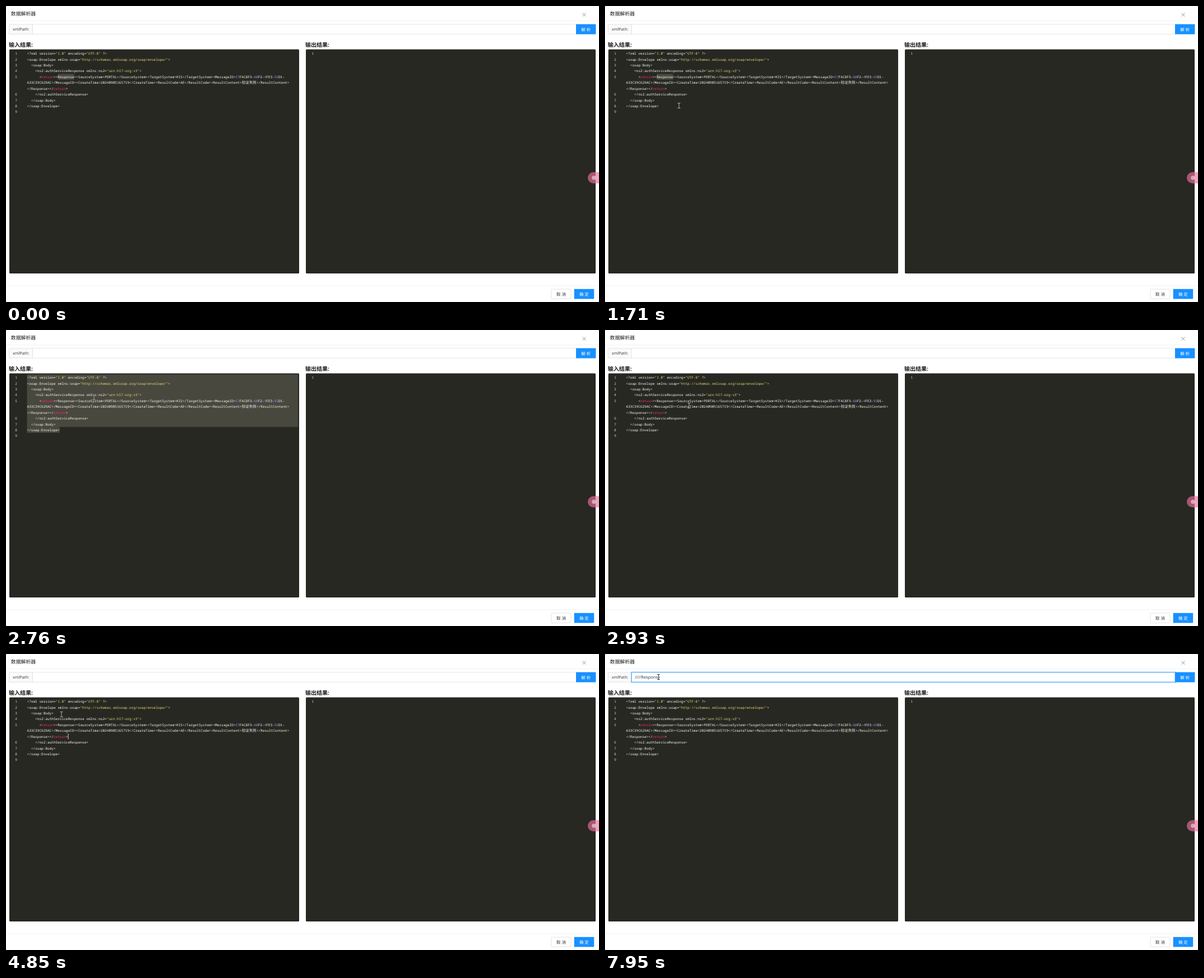
Write an HTML page that moves like this. It is 1058 px wide and 529 px high and loops after 8 s.

```html
<!DOCTYPE html>
<html lang="zh-CN">
<head>
<meta charset="utf-8">
<style>
html, body { margin: 0; width: 100%; height: 100%; overflow: hidden; background: #b5b5b5; }
svg { display: block; width: 1058px; height: 529px; }
text { font-family: "Open Sans", "Noto Sans CJK SC", "Noto Sans CJK", sans-serif; text-rendering: geometricPrecision; white-space: pre; }
.ui { font-size: 7.5px; fill: #333; }
.mid { text-anchor: middle; }
.title { font-size: 8.88px; font-weight: 500; fill: #1c1c1c; }
.head { font-size: 10px; font-weight: 700; fill: #1c1c1c; }
.code { font: 500 6.09px "Noto Sans Mono", "Noto Sans CJK SC", "Noto Sans CJK", monospace; fill: #f8f8f2; }
.num { fill: #d4d4ce; text-anchor: middle; }
.string { fill: #e6db74; }
.tag { fill: #f92672; }
.digit { fill: #ae81ff; }
.han { font-size: 6.65px; }
.editor { fill: #272822; }
.line { stroke: #ececec; stroke-width: .7; }
.box { fill: #fff; stroke: #d9d9d9; stroke-width: .7; }
.primary { fill: #1890ff; }
#ibeam { mix-blend-mode: difference; fill: none; stroke: #fff; stroke-width: .8; }
</style>
</head>
<body>
<svg viewBox="0 0 1058 529">
  <rect width="1058" height="529" rx="2" fill="#fff"/>
  <text class="title" x="8.8" y="16.8">数据解析器</text>
  <path d="M1028.6 12.6l6 6m0-6l-6 6" stroke="#777" stroke-width=".8"/>
  <path class="line" d="M0 26.7H1058M0 500H1058"/>

  <rect class="box" x="5.5" y="32.8" width="42" height="17.4" rx="1" style="fill:#fafafa"/>
  <text class="ui" x="12" y="44.4" style="font-size:7.2px">xmlPath:</text>
  <rect class="box" x="47.4" y="32.8" width="970" height="17.4"/>
  <rect id="glow" x="46.9" y="32.4" width="970.6" height="18.2" fill="none" stroke="#1890ff" stroke-opacity=".3" stroke-width="1.8"/>
  <rect id="hover" x="47.3" y="32.8" width="970" height="17.4" fill="none" stroke="#40a9ff" stroke-width=".9"/>
  <path class="primary" d="M1017 32.5h34.4q1 0 1 1v16q0 1-1 1H1017z"/>
  <text class="ui mid" x="1034.8" y="44.6" style="fill:#fff">解 析</text>
  <text class="ui" id="typed" x="53.3" y="44.4"></text>

  <text class="head" x="5" y="73.4">输入结果:</text>
  <text class="head" x="534" y="73.4">输出结果:</text>
  <rect class="editor" x="6" y="77.5" width="517" height="400.5" rx="1.5"/>
  <rect class="editor" x="535" y="77.5" width="517" height="400.5" rx="1.5"/>
  <path id="selection" fill="#49483e"/>
  <g id="code"></g>
  <text class="code num" x="547" y="87">1</text>

  <rect class="box" x="973" y="506" width="35" height="17.3" rx="1"/>
  <text class="ui mid" x="990.5" y="517.6">取 消</text>
  <rect class="primary" x="1013.7" y="505.8" width="35.5" height="17.8" rx="1"/>
  <text class="ui mid" x="1031.4" y="517.6" style="fill:#fff">确 定</text>

  <path d="M1058 297h-10a10 10 0 0 0 0 20h10z" fill="#f06ea0" opacity=".65"/>
  <circle cx="1049" cy="307" r="3.8" fill="#fff" opacity=".5"/>

  <rect id="caret" width=".8"/>
  <path id="ibeam" d="M-2.5-4.4H2.5M0-4.4V4.4M-2.5 4.4H2.5"/>
  <path id="arrow" d="M0 0V9L2 7.2 3.4 10 4.7 9.4 3.4 6.8H6.2z" fill="#fff" stroke="#000" stroke-width=".5"/>
</svg>
<script>
const $ = id => document.getElementById(id);
const LEFT = 37.5, RIGHT = 521, TOP = 79.5, ROW = 10.43, COL = 3.655;
const colX = col => LEFT + col * COL;
const rowY = row => TOP + row * ROW;

// Each entry is one visual row; the number is empty on wrapped rows.
const rows = [
  [1, '<?xml version="1.0" encoding="UTF-8" ?>'],
  [2, '<soap:Envelope xmlns:soap="http://schemas.xmlsoap.org/soap/envelope/">'],
  [3, '  <soap:Body>'],
  [4, '    <ns2:authServiceResponse xmlns:ns2="urn:hl7-org:v3">'],
  [5, '      <return><Response><SourceSystem>PORTAL</SourceSystem><TargetSystem>HIS</TargetSystem><MessageID>57FAC8F3-68F2-4FE3-93D1-'],
  ['', 'A33C39C629AC</MessageID><CreateTime>20240905165719</CreateTime><ResultCode>AE</ResultCode><ResultContent>验证失败</ResultContent>'],
  ['', '</Response></return>'],
  [6, '    </ns2:authServiceResponse>'],
  [7, '  </soap:Body>'],
  [8, '</soap:Envelope>'],
  [9, '']
];
const tokens = /(?<string>"[^"]*")|(?<tag>return)|(?<digit>(?<=[>-])\d{1,2}(?=[A-F]))|(?<han>[一-龥]+)/g;

function addText(parent, tag, className, text, x, y) {
  const el = document.createElementNS('http://www.w3.org/2000/svg', tag);
  el.setAttribute('class', className);
  if (x) { el.setAttribute('x', x); el.setAttribute('y', y); }
  el.textContent = text;
  return parent.appendChild(el);
}

rows.forEach(([number, source], i) => {
  const y = rowY(i) + 7.6;
  addText($('code'), 'text', 'code num', number, 18, y);
  // Indentation is a column offset, so that spaces need no preserving.
  const body = source.trimStart();
  const line = addText($('code'), 'text', 'code', '', colX(source.length - body.length), y);
  let end = 0;
  for (const m of body.matchAll(tokens)) {
    line.append(body.slice(end, m.index));
    const kind = Object.keys(m.groups).find(k => m.groups[k]);
    addText(line, 'tspan', kind, m[0]);
    end = m.index + m[0].length;
  }
  line.append(body.slice(end));
});

// Pointer path: time, x, y
const path = [
  [0, 779, 0], [390, 779, 0], [400, 620, 1], [750, 380, 20], [1110, 215, 41],
  [1200, 205, 44], [1450, 160, 120], [1680, 132, 178], [1730, 132, 178],
  [1850, 97, 179], [2000, 42, 178], [2100, 37, 165], [2400, 35, 85],
  [2500, 35, 85], [2740, 157, 120], [2780, 157, 120], [2860, 152, 127],
  [2930, 150, 135], [3030, 144, 140], [3350, 112, 128], [3480, 112, 128],
  [3720, 142, 128], [4100, 142, 128], [4400, 113, 147], [4640, 113, 147],
  [4850, 99, 108], [5080, 95, 60], [5250, 98, 41], [5420, 99.7, 41],
  [7940, 99.7, 41], [7950, 95.5, 41], [8000, 95.5, 41]
];

function pointerAt(t) {
  const i = path.findIndex(key => key[0] > t);
  const [t0, x0, y0] = path[i - 1], [t1, x1, y1] = path[i];
  const k = (t - t0) / (t1 - t0);
  return [x0 + (x1 - x0) * k, y0 + (y1 - y0) * k];
}

const rect = (x0, y0, x1, y1) => `M${x0} ${y0}H${x1}V${y1}H${x0}z`;
const word = (from, to) => rect(colX(from), rowY(4), colX(to), rowY(5));

function dragSelection(x, y) {
  const row = Math.max(0, Math.floor((y - TOP) / ROW));
  const start = colX(Math.max(0, Math.min(16, Math.round((x - LEFT) / COL))));
  const last = 9, end = colX(16);
  if (row >= last) return rect(start, rowY(last), end, rowY(last + 1));
  return rect(start, rowY(row), RIGHT, rowY(row + 1)) +
    rect(LEFT, rowY(row + 1), RIGHT, rowY(last)) +
    rect(LEFT, rowY(last), end, rowY(last + 1));
}

function selectionAt(t) {
  if (t < 1850 || (t >= 3400 && t < 3770)) return word(15, 23);
  if (t < 2860) return dragSelection(...pointerAt(Math.min(t, 2450)));
  if (t >= 3920 && t < 4350) return word(25, 37);
  return '';
}

function typedAt(t) {
  if (t < 6500) return '';
  if (t < 6590) return '/';
  if (t < 7110) return '//';
  return t < 7200 ? '////' : '////Response';
}

// Caret spans: from, until, x, top, colour
const light = '#f8f8f0', dark = '#222';
const carets = [
  [3770, 3920, colX(28), rowY(4), light],
  [4450, 4950, colX(20), rowY(6), light],
  [5500, 5930, 53.2, 36.3, dark],
  [6500, 6590, 56.4, 36.3, dark],
  [6590, 7110, 59.3, 36.3, dark],
  [7110, 7200, 64.5, 36.3, dark],
  [7200, 7670, 98.3, 36.3, dark]
];

function set(id, attributes) {
  for (const name in attributes) $(id).setAttribute(name, attributes[name]);
}

function draw() {
  const t = performance.now() % 8000;
  const [x, y] = pointerAt(t);
  const visible = t >= 400 || (t >= 120 && t < 200);
  const overInput = y > 32 && y < 51;
  const textPointer = overInput || y > 78;
  const transform = `translate(${x} ${y})`;
  set('ibeam', { transform, visibility: visible && textPointer ? 'visible' : 'hidden' });
  set('arrow', { transform, visibility: visible && !textPointer ? 'visible' : 'hidden' });
  set('hover', { opacity: overInput ? 1 : 0 });
  set('glow', { opacity: Math.max(0, Math.min(1, (t - 5450) / 200)) });
  set('selection', { d: selectionAt(t) });
  const caret = carets.find(([from, until]) => t >= from && t < until);
  if (caret) set('caret', { x: caret[2], y: caret[3], height: 10.4, fill: caret[4] });
  set('caret', { visibility: caret ? 'visible' : 'hidden' });
  $('typed').textContent = typedAt(t);
  requestAnimationFrame(draw);
}
draw();
</script>
</body>
</html>
```
